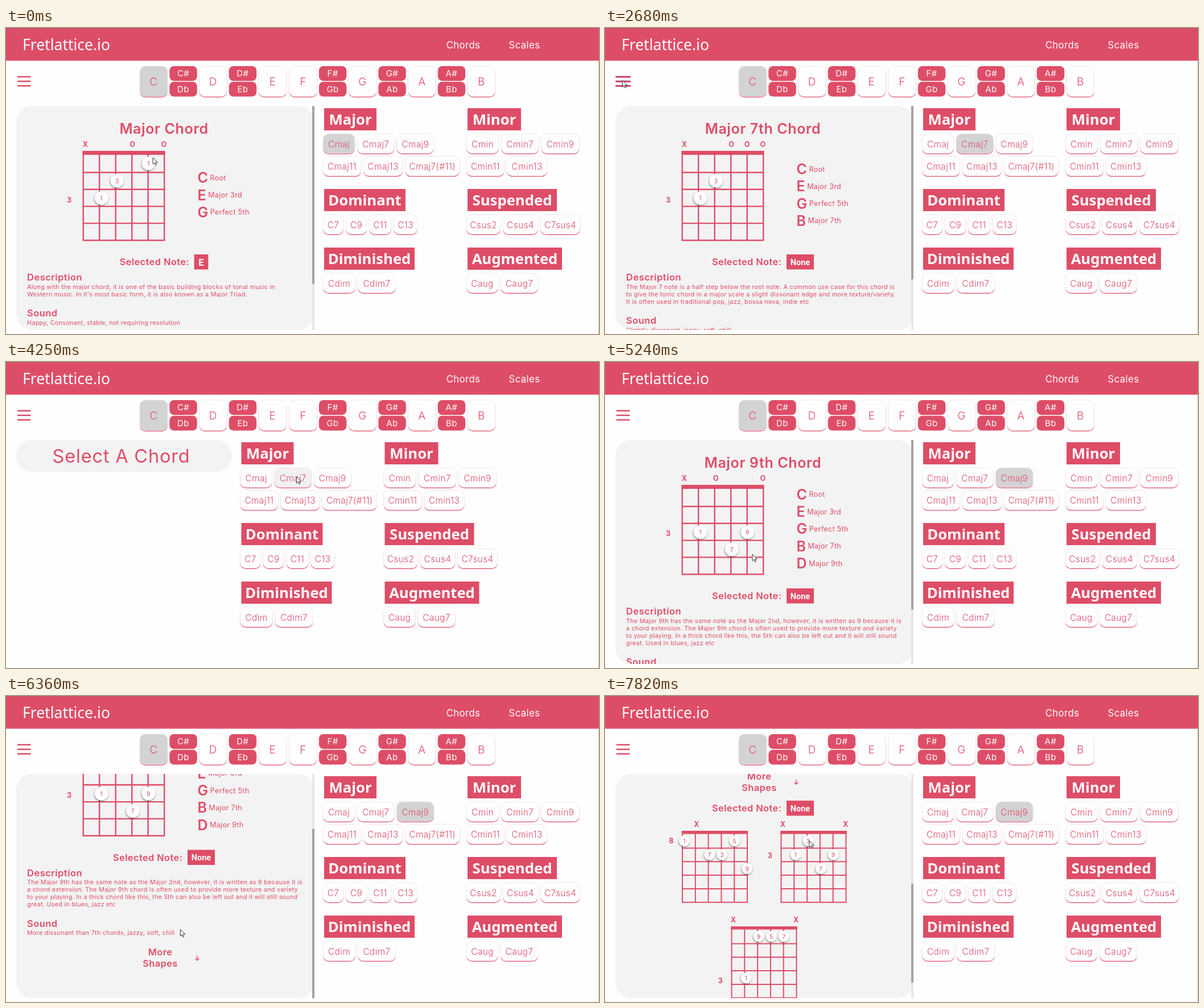
Write an HTML page with a canvas that moves like this. It is 1042 px wide and 538 px high and loops after 8000 ms.

```html
<!DOCTYPE html>
<html lang="en">
<head>
<meta charset="utf-8">
<title>Chord finder</title>
<style>
  html, body { margin: 0; width: 100%; height: 100%; overflow: hidden; background: #fefefe; }
  canvas { display: block; }
</style>
</head>
<body>
<canvas id="stage" width="1042" height="538"></canvas>
<script>
const ctx = document.getElementById('stage').getContext('2d');
const LOOP = 8000;
const PINK = '#de4d67', PAPER = '#fefefe', PANEL = '#f3f3f3', ACTIVE = '#d3d3d3', HOVER = '#f0f0f0';
const SANS = 'Inter, sans-serif', HEAD = '"Noto Sans", sans-serif', TAG = 'Roboto, sans-serif';
const PANEL_TOP = 137, PANEL_H = 394;

// Chord buttons: label and width, laid out in rows with a fixed gap.
const groups = [
  { title: 'Major', x: 559, y: 141, w: 92, rows: [
    [['Cmaj', 56], ['Cmaj7', 65.5], ['Cmaj9', 65.5]],
    [['Cmaj11', 67], ['Cmaj13', 69], ['Cmaj7(#11)', 96.5]]] },
  { title: 'Minor', x: 811, y: 141, w: 94, rows: [
    [['Cmin', 57], ['Cmin7', 66.5], ['Cmin9', 67]],
    [['Cmin11', 67], ['Cmin13', 71]]] },
  { title: 'Dominant', x: 559, y: 283, w: 143, rows: [[['C7', 36], ['C9', 37], ['C11', 39], ['C13', 42]]] },
  { title: 'Suspended', x: 811, y: 283, w: 157, rows: [[['Csus2', 60], ['Csus4', 62], ['C7sus4', 70]]] },
  { title: 'Diminished', x: 559, y: 386, w: 159, rows: [[['Cdim', 57], ['Cdim7', 67]]] },
  { title: 'Augmented', x: 811, y: 386, w: 166, rows: [[['Caug', 56], ['Caug7', 66]]] },
];

// Notes are [string, row, finger or degree]; marks pair a symbol with a string.
const chords = {
  Cmaj: {
    title: 'Major Chord',
    marks: [['X', 0], ['O', 3], ['O', 5]],
    notes: [[1, 3, 1], [2, 2, 3], [4, 1, 1]],
    tones: ['C Root', 'E Major 3rd', 'G Perfect 5th'],
    lines: ['Along with the major chord, it is one of the basic building blocks of tonal music in',
      "Western music. In it's most basic form, it is also known as a Major Triad."],
    sound: 'Happy, Consonant, stable, not requiring resolution',
    height: 496,
  },
  Cmaj7: {
    title: 'Major 7th Chord',
    marks: [['X', 0], ['O', 3], ['O', 4], ['O', 5]],
    notes: [[1, 3, 1], [2, 2, 3]],
    tones: ['C Root', 'E Major 3rd', 'G Perfect 5th', 'B Major 7th'],
    lines: ['The Major 7 note is a half step below the root note. A common use case for this chord is',
      'to give the tonic chord in a major scale a slight dissonant edge and more texture/variety.',
      'It is often used in traditional pop, jazz, bossa nova, indie etc'],
    sound: 'Slightly dissonant, jazzy, soft, chill',
    height: 509,
  },
  Cmaj9: {
    title: 'Major 9th Chord',
    marks: [['X', 0], ['O', 2], ['O', 5]],
    notes: [[1, 3, 1], [4, 3, 9], [3, 4, 7]],
    tones: ['C Root', 'E Major 3rd', 'G Perfect 5th', 'B Major 7th', 'D Major 9th'],
    lines: ['The Major 9th has the same note as the Major 2nd, however, it is written as 9 because it is',
      'a chord extension. The Major 9th chord is often used to provide more texture and variety',
      'to your playing. In a thick chord like this, the 5th can also be left out and it will still sound',
      'great. Used in blues, jazz etc'],
    sound: 'More dissonant than 7th chords, jazzy, soft, chill',
    height: 521,
  },
};

// Keyframes: [time, values...]
const cursorPath = [
  [60, 258, 228], [240, 252, 235], [400, 256, 236], [820, 526, 238], [1240, 644.5, 194], [1410, 644.5, 194],
  [1530, 660, 223], [1690, 709, 224], [2340, 30.5, 92], [3290, 30.5, 92], [3780, 588, 252],
  [4070, 540, 226], [4230, 510.5, 201.5], [4310, 510.5, 201.5], [4430, 572, 203], [4560, 572, 203],
  [4900, 259, 323], [5070, 259, 338], [5240, 259, 338], [5500, 255.5, 345], [6060, 255.5, 345],
  [6600, 342.5, 457], [7110, 342.5, 457], [7680, 357, 253], [7820, 359, 254.5],
];
const scrollPath = [[5240, 0], [5600, 100], [5880, 100], [6020, 127.5], [7110, 127.5], [7700, 437]];

function track(keys, t) {
  const next = keys.findIndex(k => k[0] > t);
  if (next === 0) return keys[0].slice(1);
  if (next < 0) return keys[keys.length - 1].slice(1);
  const a = keys[next - 1], b = keys[next];
  const u = (t - a[0]) / (b[0] - a[0]), e = u * u * (3 - 2 * u);
  return a.slice(1).map((v, i) => v + (b[i + 1] - v) * e);
}

// y is the vertical centre of the capitals.
function text(str, x, y, size, { weight = 400, color = PINK, align = 'center', font = SANS } = {}) {
  ctx.font = `${weight} ${size}px ${font}`;
  ctx.letterSpacing = font === SANS ? `${size * 0.025}px` : '0px';
  ctx.textAlign = align;
  ctx.fillStyle = color;
  ctx.fillText(str, x, y + size * 0.36);
}

function rect(x, y, w, h, color) {
  ctx.fillStyle = color;
  ctx.fillRect(x, y, w, h);
}

function round(x, y, w, h, r, color) {
  ctx.beginPath();
  ctx.roundRect(x, y, w, h, r);
  ctx.fillStyle = color;
  ctx.fill();
}

const inside = (p, x, y, w, h) => p.x >= x && p.x <= x + w && p.y >= y && p.y <= y + h;

function button(label, x, y, w, h, size, fill) {
  round(x, y + 4, w, h - 4, 10, PINK);
  round(x, y, w, h - 1.5, 10, fill);
  ctx.strokeStyle = '#f2e1e4';
  ctx.lineWidth = 0.8;
  ctx.stroke();
  text(label, x + w / 2, y + h / 2, size, { weight: 300 });
}

function drawHeader(mouse) {
  rect(0, 0, 1042, 57.5, PINK);
  rect(0, 0, 1042, 1, '#b0606f');
  rect(1041, 58, 1, 480, '#c4c4c4');
  text('Fretlattice.io', 29, 29, 26.5, { color: '#fff', align: 'left', font: HEAD });
  text('Chords', 803.5, 29.5, 16.7, { color: '#fff' });
  text('Scales', 911, 29.5, 16.7, { color: '#fff' });

  const over = inside(mouse, 18, 82, 28, 24);
  for (let i = 0; i < 3; i++) {
    if (over) rect(18.5, 84.5 + i * 8, 26.5, 2.8, '#c8375a');
    else rect(20, 84.5 + i * 8, 23.5, 2.5, PINK);
  }
}

function drawKeys() {
  const slots = [...'CDEFGAB'].map((name, i) => [name, 235 + i * 104.4 - (i > 2 ? 50.6 : 0)]);
  slots.forEach(([name, x], i) => {
    // E and F sit next to each other, later keys follow the same pitch.
    button(name, x, 67, 49, 55, 19, i ? PAPER : ACTIVE);
    if (name === 'E' || name === 'B') return;
    const flat = 'CDEFGAB'[i + 1] || 'A';
    [[name + '#', 67], [(name === 'A' ? 'B' : flat) + 'b', 94.5]].forEach(([label, y]) => {
      round(x + 52.3, y, 48.5, 26, 8, PINK);
      text(label, x + 76.5, y + 13, 15, { color: '#fff' });
    });
  });
}

function drawChordList(mouse, shift, active) {
  ctx.save();
  ctx.translate(shift, 0);
  const p = { x: mouse.x - shift, y: mouse.y };
  for (const g of groups) {
    rect(g.x, g.y, g.w, 39, PINK);
    text(g.title, g.x + g.w / 2, g.y + 20, 25.7, { weight: 600, color: '#fff', font: HEAD });
    g.rows.forEach((row, r) => {
      let x = g.x - 2;
      const y = g.y + 45 + r * 39.5;
      for (const [label, w] of row) {
        const fill = active.includes(label) ? ACTIVE : inside(p, x, y, w, 36) ? HOVER : PAPER;
        button(label, x, y, w, 36, 15.4, fill);
        x += w + 4;
      }
    });
  }
  ctx.restore();
}

function drawFretboard(x, y, s, marks, notes, [position, row]) {
  ctx.strokeStyle = PINK;
  ctx.lineWidth = 2.4 - (1 - s) * 2;
  ctx.beginPath();
  for (let i = 0; i < 6; i++) {
    ctx.moveTo(x + i * 28.5 * s, y);
    ctx.lineTo(x + i * 28.5 * s, y + 157.2 * s);
    const fy = y + (8.2 + i * 29.8) * s;
    if (i) { ctx.moveTo(x - 1, fy); ctx.lineTo(x + 142.5 * s + 1, fy); }
  }
  ctx.stroke();
  rect(x - 1.2, y, 142.5 * s + 2.4, 7 * s, PINK);

  const stringX = i => x + (4.3 + 27.6 * i) * s;
  const rowY = r => y + (22 + 30.5 * (r - 1)) * s;
  for (const [mark, i] of marks) text(mark, stringX(i) - 0.5, y - 11.5, 12.5, { weight: 700 });
  text(position, x - 24.5 * s, rowY(row) + (row - 1) * 1.5, 12.5, { weight: 700 });
  for (const [i, r, label] of notes) {
    ctx.save();
    ctx.shadowColor = 'rgba(0,0,0,.45)';
    ctx.shadowBlur = 3;
    ctx.shadowOffsetX = -0.5;
    ctx.shadowOffsetY = 1.5;
    ctx.beginPath();
    ctx.arc(stringX(i), rowY(r), 12 * s, 0, 7);
    ctx.fillStyle = '#fff';
    ctx.fill();
    ctx.restore();
    text(label, stringX(i), rowY(r) + 0.5, 10.5);
  }
}

function drawSelected(note, y) {
  const w = note === 'None' ? 48 : 24.7, left = 277.5 - (131 + w) / 2;
  text('Selected Note:', left, y, 16.4, { weight: 600, align: 'left' });
  rect(left + 131, y - 13.5, w, 26.5, PINK);
  text(note, left + 131 + w / 2, y, note === 'None' ? 14.5 : 17, { weight: 700, color: '#fff', font: TAG });
}

function drawMoreButton(y, hovered) {
  ctx.save();
  ctx.translate(271, y);
  if (hovered) ctx.scale(1.1, 1.1);
  text('More', 0, -10, 16.4, { weight: 600 });
  text('Shapes', 0, 10, 16.4, { weight: 600 });
  ctx.strokeStyle = PINK;
  ctx.lineWidth = 1.4;
  ctx.stroke(new Path2D('M65 -4.5V4M61.5 .8L65 4.3L68.5 .8'));
  ctx.restore();
}

function drawPanel(chord, note, scroll, expanded, mouse) {
  round(18, PANEL_TOP, 524, PANEL_H, 28, PANEL);
  ctx.save();
  ctx.clip();
  ctx.translate(0, -scroll);
  text(chord.title, 277.5, 177, 25, { weight: 600 });
  drawFretboard(135.7, 216, 1, chord.marks, chord.notes, [3, 3]);

  chord.tones.forEach((tone, i) => {
    const y = 293.5 + (i - (chord.tones.length - 1) / 2) * 30.3;
    text(tone[0], 336.5, y, 25, { weight: 600, align: 'left' });
    const w = ctx.measureText(tone[0]).width;
    text(tone.slice(2), 336.5 + w + 3, y, 12.5, { align: 'left' });
  });

  drawSelected(note, 411.5);
  const left = { align: 'left' }, heading = { align: 'left', weight: 600 };
  const soundY = 475 + 13 * chord.lines.length;
  text('Description', 37, 438.5, 16.6, heading);
  chord.lines.forEach((line, i) => text(line, 37, 455 + i * 13, 10.8, left));
  text('Sound', 37, soundY + 0.5, 16.6, heading);
  text(chord.sound, 37, soundY + 17, 10.8, left);

  const moreY = soundY + 61;
  drawMoreButton(moreY, inside(mouse, 235, moreY - 20 - scroll, 115, 40));
  if (expanded) {
    drawSelected('None', 634.5);
    drawFretboard(136, 674, 0.8, [['X', 1]], [[0, 1, 1], [4, 1, 5], [2, 2, 7], [3, 2, 3], [5, 3, 9]], [8, 1]);
    drawFretboard(309.5, 674, 0.8, [['X', 0], ['X', 5]], [[2, 1, 3], [1, 2, 1], [4, 2, 9], [3, 3, 7]], [3, 2]);
    drawFretboard(222.5, 842, 0.8, [['X', 0], ['X', 5]], [[2, 1, 9], [3, 1, 5], [4, 1, 7], [1, 4, 1]], [3, 4]);
  }
  ctx.restore();

  const ratio = PANEL_H / (expanded ? 892 : chord.height);
  rect(538, PANEL_TOP, 4, PANEL_H, '#e6e6e6');
  round(538, PANEL_TOP + scroll * ratio, 4, PANEL_H * ratio, 1, '#a3a3a3');
}

function drawCursor({ x, y }) {
  ctx.save();
  ctx.translate(x, y);
  const arrow = new Path2D('M0 0V11.5L2.7 9L4.6 13.2L6.4 12.4L4.6 8.3H8.3Z');
  ctx.fillStyle = '#fff';
  ctx.fill(arrow);
  ctx.strokeStyle = '#333';
  ctx.lineWidth = 1;
  ctx.stroke(arrow);
  ctx.restore();
}

function draw() {
  const t = performance.now() % LOOP;
  const [x, y] = track(cursorPath, t), mouse = { x, y };
  const name = t < 1410 ? 'Cmaj' : t < 2810 ? 'Cmaj7' : t < 4540 ? null : 'Cmaj9';
  const active = [name];
  if (t > 1240 && t < 1410) active.push('Cmaj7');
  if (t > 4480) active.push('Cmaj9');
  const note = t < 120 ? 'E' : t < 1410 ? 'C' : 'None';

  rect(0, 0, 1042, 538, PAPER);
  drawHeader(mouse);
  drawKeys();
  if (name) {
    drawPanel(chords[name], note, track(scrollPath, t)[0], t >= 6720, mouse);
  } else {
    round(18, PANEL_TOP, 379, 56, 28, PANEL);
    text('Select A Chord', 202.5, 165.5, 32.5);
  }
  drawChordList(mouse, name ? 0 : -145.5, active);
  drawCursor(mouse);
  requestAnimationFrame(draw);
}
draw();
</script>
</body>
</html>
```
